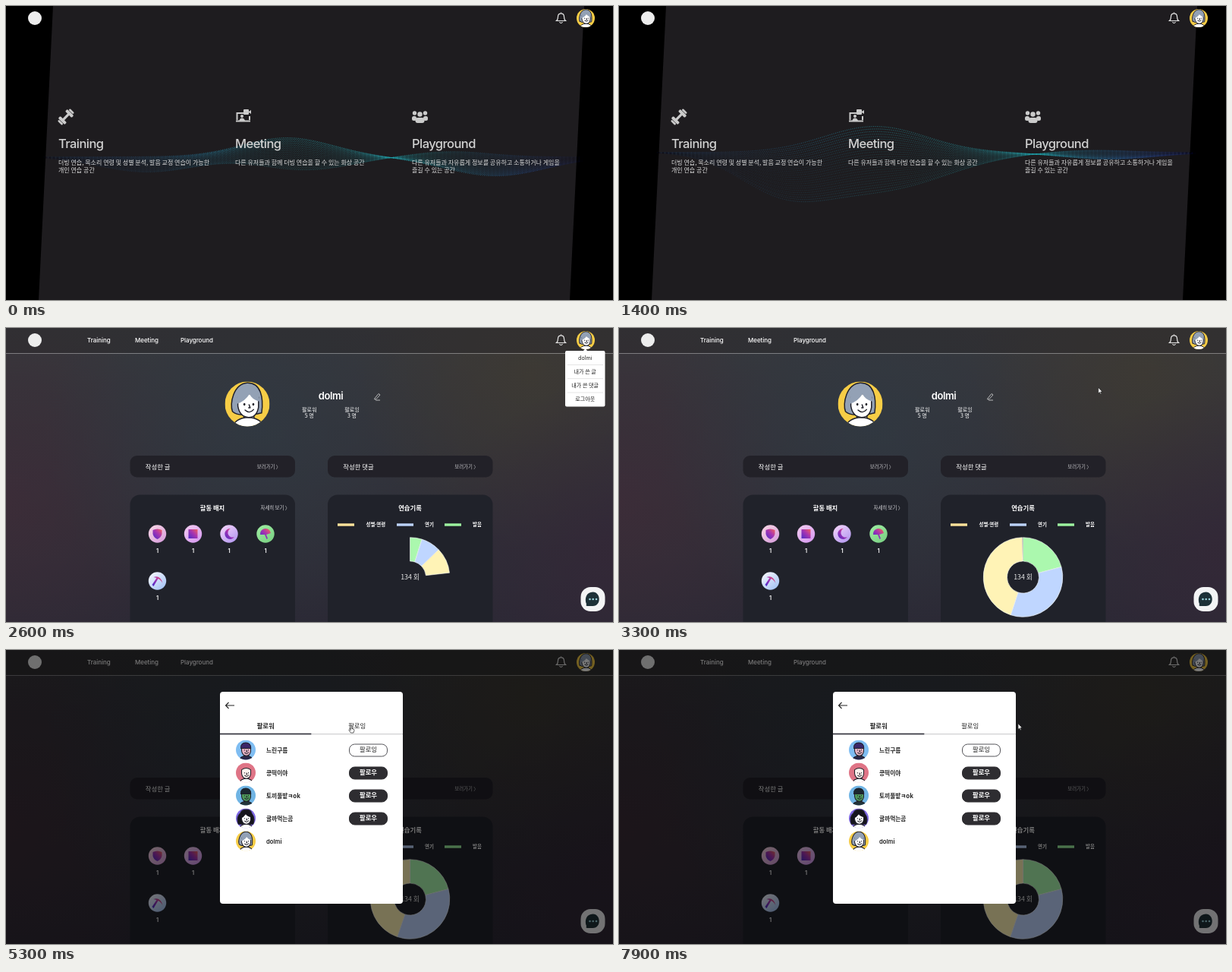
An HTML page with a canvas that plays this animation: 800 px wide and 387 px high, repeating every 8000 ms.

```html
<!DOCTYPE html>
<html lang="ko">
<head>
<meta charset="utf-8">
<style>
html, body { margin: 0; width: 100%; height: 100%; overflow: hidden; background: #000; }
canvas { display: block; width: 800px; height: 387px; }
</style>
</head>
<body>
<canvas id="stage" width="800" height="387"></canvas>
<script>
const ctx = document.getElementById('stage').getContext('2d');
const LOOP = 8000, W = 800, H = 387, TAU = Math.PI * 2;
const LATIN = 'Inter, "Noto Sans CJK KR", sans-serif';
const KOREAN = '"Noto Sans CJK KR", "Noto Sans CJK", sans-serif';
const USER = 'dolmi';
const AT = { menuOpen: 1700, profile: 2400, chart: 2537, menuClose: 3000, modal: 4400, following: 5800, followers: 7500 };

const clamp = v => Math.max(0, Math.min(1, v));
const lerp = (a, b, u) => a + (b - a) * u;
const smooth = u => u * u * (3 - 2 * u);
const between = (t, a, b) => t >= a && t < b;

function text(s, x, y, size, { color = '#fff', align = 'left', weight = 400, spacing = 0 } = {}) {
  const family = /[\u3000-\uffff]/.test(s) ? KOREAN : LATIN;
  ctx.font = `${weight} ${size}px ${family}`;
  ctx.letterSpacing = spacing + 'px';
  ctx.textAlign = align;
  ctx.fillStyle = color;
  ctx.fillText(s, x, y);
}
function rect(x, y, w, h, color) {
  ctx.fillStyle = color;
  ctx.fillRect(x, y, w, h);
}
function roundBox(x, y, w, h, r, fill, stroke) {
  ctx.beginPath();
  ctx.roundRect(x, y, w, h, r);
  ctx.fillStyle = fill;
  ctx.fill();
  if (stroke) { ctx.strokeStyle = stroke; ctx.lineWidth = 1; ctx.stroke(); }
}
function ellipse(x, y, rx, ry, fill, stroke, width = 1) {
  ctx.beginPath();
  ctx.ellipse(x, y, rx, ry, 0, 0, TAU);
  if (fill) { ctx.fillStyle = fill; ctx.fill(); }
  if (stroke) { ctx.strokeStyle = stroke; ctx.lineWidth = width; ctx.stroke(); }
}
function path(d, fill, stroke, width = 1) {
  const p = new Path2D(d);
  if (fill) { ctx.fillStyle = fill; ctx.fill(p); }
  if (stroke) { ctx.strokeStyle = stroke; ctx.lineWidth = width; ctx.stroke(p); }
}
function local(x, y, scale, draw) {
  ctx.save();
  ctx.translate(x, y);
  ctx.scale(scale, scale);
  ctx.lineCap = ctx.lineJoin = 'round';
  draw();
  ctx.restore();
}

const HAIR = {
  bob: 'M-.66 .34C-.8 .0-.62-.9 .0-.94C.6-.95 .74-.3 .64 .4Q.3 .5 0 .45Q-.4 .55-.66 .34Z',
  short: 'M-.5 .05C-.62-.9 .6-.95 .52 .05Z',
  curly: 'M-.75 .6Q-1-.1-.55-.5C-.4-1 .5-1 .6-.5Q1 0 .75 .6Z'
};
function avatar(x, y, r, { bg = '#f7cd46', hair = '#93a1b5', skin = '#fff', shirt = '#fff', style = 'bob' } = {}) {
  const ink = '#20202a', pen = r > 20 ? .05 : .08;
  local(x, y, r, () => {
    ctx.beginPath();
    ctx.arc(0, 0, 1, 0, TAU);
    ctx.clip();
    rect(-1, -1, 2, 2, bg);
    if (style !== 'short' && HAIR[style]) path(HAIR[style], hair, ink, pen);
    path('M-.15 .3V.75H.3V.3Z', skin, ink, pen);
    ellipse(.04, 1.06, .68, .46, shirt, ink, pen);
    path('M-.42-.3Q.05-.62 .5-.3V.15Q.42 .6 .06 .6Q-.34 .58-.42 .1Z', skin, ink, pen);
    if (style === 'bob') path('M-.52 .02Q-.45-.65 .05-.7Q.5-.65 .56-.1Q.2-.2 .1-.45Q-.1-.1-.52 .02Z', hair);
    if (style === 'short') path(HAIR.short.replaceAll('.05', '-.15'), hair, ink, pen);
    if (style === 'curly') path('M-.5 0Q-.4-.7 .1-.7Q.55-.6 .54-.1Q.1-.2 0-.4Q-.2-.1-.5 0Z', hair);
    ellipse(-.13, .02, .045, .06, ink);
    ellipse(.27, .02, .045, .06, ink);
    path('M-.1 .27Q.1 .46 .28 .25M.08 .03L.13 .17H.06', null, ink, pen);
  });
}

const WAVE = [
  { base: 198, top: [[-25, 370, 85], [25, 645, 95]], bottom: [[17, 395, 85], [20, 185, 90], [-7, 585, 70]] },
  { base: 192, top: [[-34, 337, 95], [9, 645, 90]], bottom: [[48, 345, 125], [45, 215, 85], [-3, 620, 70]] }
];
function waveEdge(side, x, u) {
  const [from, to] = WAVE;
  return from[side].reduce((y, [amp, c, w], i) => {
    const [amp2, c2, w2] = to[side][i];
    const d = (x - lerp(c, c2, u)) / lerp(w, w2, u);
    return y + lerp(amp, amp2, u) * Math.exp(-d * d);
  }, lerp(from.base, to.base, u));
}
function drawWave(t) {
  const u = t / 1400, rows = 26;
  for (let x = 50; x < 760; x += 2.5) {
    const a = waveEdge('top', x, u), b = waveEdge('bottom', x, u);
    const fade = clamp((x - 40) / 240) * clamp((765 - x) / 100);
    const hue = x < 400 ? lerp(212, 184, clamp((x - 130) / 230)) : lerp(184, 228, clamp((x - 560) / 170));
    for (let k = 0; k <= rows; k++) {
      const v = k / rows;
      const glow = .17 + .38 * Math.pow(1 - v, 3) + .16 * Math.pow(v, 8);
      ctx.fillStyle = `hsla(${hue},62%,42%,${(glow * fade).toFixed(3)})`;
      ctx.fillRect(x + (k % 2) * 1.2, lerp(a, b, v), 1.1, 1.1);
    }
  }
}

function dumbbell() {
  local(79, 146, 1, () => {
    ctx.rotate(-Math.PI / 4);
    rect(-5, -1.6, 10, 3.2, '#cbcbcb');
    for (const s of [-1, 1]) {
      roundBox(s * 6.5 - 2, -6, 4, 12, 1.3, '#cbcbcb');
      roundBox(s * 10.3 - 1.3, -4, 2.6, 8, 1.2, '#cbcbcb');
    }
  });
}
function meetingIcon() {
  path('M304.5 150V141H313M321 145V150M303 151.5H322', null, '#cbcbcb', 2);
  roundBox(313, 136, 7, 7, 1, '#cbcbcb');
  path('M319 139.5L323 137V142Z', '#cbcbcb');
  ellipse(311, 145, 2, 2, '#cbcbcb');
  path('M307.5 151Q308 147.5 311 147.5T315 151Z', '#cbcbcb');
}
function groupIcon() {
  for (const [x, y, r] of [[538.5, 141, 2.7], [552.5, 141, 2.7], [545.5, 142.5, 3.2]]) ellipse(x, y, r, r, '#cbcbcb');
  roundBox(535, 145, 6, 6, 2.5, '#cbcbcb');
  roundBox(550, 145, 6, 6, 2.5, '#cbcbcb');
  roundBox(539.5, 147, 12, 7, 3, '#cbcbcb');
}
function drawHeader() {
  ellipse(38, 16, 9, 9, '#ededed');
  path('M725.5 19.5H737.5Q735.5 18 735.5 14C735.5 8.5 727.5 8.5 727.5 14Q727.5 18 725.5 19.5ZM731.5 9.8V8.5M729.5 21Q731.5 24 733.5 21', null, '#e8e8e8', 1.2);
  avatar(764, 16, 12);
}
function drawLanding(t) {
  rect(0, 0, W, H, '#000');
  path('M62 0H762L743 387H43Z', '#1e1c1f');
  drawWave(t);
  dumbbell();
  meetingIcon();
  groupIcon();
  const columns = [
    [69, 'Training', '더빙 연습, 목소리 연령 및 성별 분석, 발음 교정 연습이 가능한', '개인 연습 공간'],
    [302, 'Meeting', '다른 유저들과 함께 더빙 연습을 할 수 있는 화상 공간', ''],
    [535, 'Playground', '다른 유저들과 자유롭게 정보를 공유하고 소통하거나 게임을', '즐길 수 있는 공간']
  ];
  for (const [x, title, line1, line2] of columns) {
    text(title, x, 186.5, 16.5, { color: '#d2d2d2', weight: 500, spacing: -.55 });
    text(line1, x, 209, 8, { color: '#dcdcdc' });
    text(line2, x, 219, 8, { color: '#dcdcdc' });
  }
  drawHeader();
}

function glow(x, y, r, color) {
  const g = ctx.createRadialGradient(x, y, 0, x, y, r);
  g.addColorStop(0, `rgba(${color},.8)`);
  g.addColorStop(1, `rgba(${color},0)`);
  rect(0, 0, W, H, g);
}
function drawBackdrop() {
  const g = ctx.createLinearGradient(0, 0, 0, H);
  g.addColorStop(0, '#38383c');
  g.addColorStop(1, '#2b2935');
  rect(0, 0, W, H, g);
  glow(0, 230, 260, '62,44,56');
  glow(330, 130, 280, '48,57,66');
  glow(690, 60, 230, '62,58,50');
  glow(800, 300, 230, '52,39,55');
  rect(0, 0, W, 33, 'rgba(42,40,42,.5)');
  rect(0, 33, W, 1, 'rgba(255,255,255,.35)');
}

const BADGES = [
  [199.5, 271, '#f6d2e4', '#d8a0dc', 'M-6-5Q0-8 6-5V0Q5 5 0 7Q-5 5-6 0Z'],
  [246.5, 271, '#f0c8f0', '#d79cf0', 'M-6-6H6V6H-6Z'],
  [294, 271, '#f0d0fa', '#b59af0', 'M2-7A7 7 0 1 0 7 4A6 6 0 0 1 2-7Z'],
  [342, 271, '#9cecA0', '#7bd184', 'M-7 1A7 7 0 0 1 7-1L1 1L3 6L1.5 7L-1 1Z'],
  [199.5, 333, '#f2f4ff', '#a6c4f4', 'M-5-5Q4-8 7 3Q4-2 1-3L-5 7L-7 5L-1-4Z']
];
function drawBadge([x, y, light, shade, shape]) {
  local(x, y, 1, () => {
    const disc = ctx.createLinearGradient(-8, -10, 8, 10);
    disc.addColorStop(0, light);
    disc.addColorStop(1, shade);
    ellipse(0, 0, 11.7, 11.7, disc);
    const tint = ctx.createLinearGradient(-6, 6, 6, -6);
    tint.addColorStop(0, '#4c2cc8');
    tint.addColorStop(.55, '#a934b0');
    tint.addColorStop(1, '#f0625c');
    path(shape, tint);
  });
  text('1', x, y + 24.5, 7.5, { align: 'center', weight: 600 });
}

const RECORDS = [[28, '#abf8ae'], [46, '#bfd6ff'], [60, '#fff3b6']];
function drawChart(t) {
  const p = 1 - Math.pow(1 - clamp((t - AT.chart) / 1000), 4);
  let angle = -Math.PI / 2;
  if (p > 0) for (const [count, color] of RECORDS) {
    const end = angle + TAU * p * count / 134;
    ctx.beginPath();
    ctx.arc(532.5, 328, 52.3, angle, end);
    ctx.arc(532.5, 328, 21, end, angle, true);
    ctx.closePath();
    ctx.fillStyle = color;
    ctx.fill();
    ctx.strokeStyle = 'rgba(255,255,255,.8)';
    ctx.lineWidth = .7;
    ctx.stroke();
    angle = end;
  }
  text('134 회', 532.5, 331, 8.8, { align: 'center', color: '#e8e8e8' });
}
function drawCount(x, label, count, hovered) {
  const style = { align: 'center', weight: hovered ? 700 : 500 };
  text(label, x, 109.5, 7, style);
  text(count, x, 118, 7, style);
  if (hovered) {
    rect(x - 10, 110.5, 20, .8, '#fff');
    rect(x - 6.5, 119, 13, .8, '#fff');
  }
}
function drawProfile(t) {
  drawBackdrop();
  drawHeader();
  [['Training', 107], ['Meeting', 170], ['Playground', 230]].forEach(([s, x]) => text(s, x, 18.7, 8, { weight: 500, spacing: -.05 }));

  avatar(318, 100, 29.5);
  text(USER, 428, 93.5, 13, { align: 'center', weight: 600, spacing: -.4 });
  path('M486 92.5L491 86.5L493 88L488 93.5L485.7 94ZM487 95H493', null, '#c8c8c8', .9);
  drawCount(399.7, '팔로워', '5 명', between(t, 3850, AT.modal));
  drawCount(456, '팔로잉', '3 명', false);

  for (const [x, title] of [[163.5, '작성한 글'], [424, '작성한 댓글']]) {
    roundBox(x, 168, 217.5, 28.5, 9, '#222128');
    text(title, x + 20.3, 185.5, 8.4, { weight: 500 });
    text('보러가기 〉', x + 167.3, 184.7, 6.4, { color: '#c2c2c6' });
    roundBox(x, 219.5, 217.5, 190, 13, '#20222a');
  }
  text('활동 배지', 272, 240, 8.3, { align: 'center', weight: 700 });
  text('자세히 보기 〉', 335.5, 239.3, 6.4, { color: '#d4d4d8' });
  BADGES.forEach(drawBadge);

  text('연습기록', 532.5, 240, 8.3, { align: 'center', weight: 700 });
  const legend = [[437, '#ffe39b', '성별·연령', 474.5], [515, '#bcd3fb', '연기', 552], [578, '#9df4a0', '발음', 615]];
  for (const [x, color, label, labelX] of legend) {
    rect(x, 257.3, 22, 3.4, color);
    text(label, labelX, 261.3, 6.4, { weight: 700 });
  }
  drawChart(t);

  roundBox(757.5, 341, 32, 32, 13, '#f3f4f5');
  path('M773.5 347.5C784 347.5 785 366 773.5 366H766Q764 366 765 363.5C762 356 765 347.5 773.5 347.5Z', '#1d3138');
  for (const x of [769.5, 773.7, 778]) ellipse(x, 357, 1.3, 1.3, '#9cd4dc');
}
function drawMenu() {
  path('M760 31L763.5 27L767 31Z', '#fff');
  roundBox(737, 30, 52.5, 73.5, 2, '#fff');
  [USER, '내가 쓴 글', '내가 쓴 댓글', '로그아웃'].forEach((s, i) => {
    const y = 41.5 + i * 18.3;
    text(s, 763.2, y, 7.1, { align: 'center', color: '#222' });
    if (i) rect(740, y - 11.8, 47, .8, '#dedede');
  });
}

const SELF = { name: USER };
const FRIEND = '느린구름';
const FOLLOWERS = [
  { name: FRIEND, button: '팔로잉', look: { bg: '#7fbdf2', hair: '#3b2668', skin: '#e6b4c4', shirt: '#28284a', style: 'short' } },
  { name: '콩떡이야', button: '팔로우', look: { bg: '#df7486', skin: '#fff2ee', style: 'bald' } },
  { name: '토끼풀밭ㅋok', button: '팔로우', look: { bg: '#70b4e4', hair: '#1b2730', skin: '#4f9a5c', shirt: '#23343c', style: 'short' } },
  { name: '귤까먹는곰', button: '팔로우', look: { bg: '#7f68e4', hair: '#15141c', style: 'curly' } },
  SELF
];
const FOLLOWING = [
  { name: '오늘도맑음!!', button: '팔로잉', look: { bg: '#c9e0ee' } },
  { ...SELF, note: '나' },
  { name: FRIEND, button: '팔로잉', look: { bg: '#83bdf4', hair: '#17172a', skin: '#f6dfc0', shirt: '#20243c', style: 'short' } }
];
function drawRow({ name, button, note, look }, i) {
  const y = 131.5 + i * 30;
  avatar(316, y, 13, look);
  text(name, 343, y + 3, 7.7, { color: '#222', weight: 600 });
  if (note) text(note, 477.5, y + 2.8, 8.4, { color: '#222', align: 'center' });
  if (!button) return;
  const dark = button === '팔로우';
  roundBox(452.5, y - 7.5, 50, 16, 7, dark ? '#2e2d31' : '#fff', dark ? '#2e2d31' : '#55555a');
  text(button, 477.5, y + 2.8, 8.4, { color: dark ? '#fff' : '#222', align: 'center', weight: dark ? 600 : 500 });
}
function drawModal(t) {
  const following = between(t, AT.following, AT.followers);
  ctx.globalAlpha = clamp((t - AT.modal + 20) / 120);
  rect(0, 0, W, H, 'rgba(0,0,0,.53)');
  roundBox(282, 55, 241, 279, 4, '#fff');
  path('M301 73H289.5M293.5 69L289.5 73L293.5 77', null, '#222', 1.1);
  ['팔로워', '팔로잉'].forEach((label, i) => {
    const active = following === (i === 1), x = 282 + i * 120.5;
    text(label, x + 60.2, 102.8, 8.4, { align: 'center', color: '#222', weight: active ? 700 : 400 });
    rect(x, active ? 109.7 : 110.2, 120.5, active ? 1.6 : 1, active ? '#2b2b36' : '#c6c6c8');
  });
  if (following) {
    if (between(t, 6000, 6950)) rect(282, 116.5, 241, 30, '#ededec');
    text(';', 281.5, 215, 7, { color: '#222' });
  }
  (following ? FOLLOWING : FOLLOWERS).forEach(drawRow);
  ctx.globalAlpha = 1;
}

const TRACK = [
  [2750, 764, 42], [2950, 760, 60], [3800, 414, 110], [4450, 414, 110], [5200, 454, 100],
  [5800, 454, 100], [6200, 492, 139], [6750, 492, 139], [7300, 346, 100], [7600, 346, 100], [7900, 526, 97], [8000, 526, 97]
];
function drawCursor(t) {
  const i = TRACK.findIndex(([time]) => time > t);
  if (i < 1) return;
  const [t0, x0, y0] = TRACK[i - 1], [t1, x1, y1] = TRACK[i];
  const u = smooth((t - t0) / (t1 - t0));
  const x = lerp(x0, x1, u), y = lerp(y0, y1, u);
  const overTab = t > AT.modal && between(y, 92, 110) && x < 523;
  const hand = overTab || between(t, 3800, AT.modal) || t < 2900;
  const shape = hand
    ? 'M0 0Q1-1.2 1.8 0V3.5L4.5 4.3Q5.3 4.8 4.8 6.5L4 9H.3L-2 5.6Q-2.3 4.4-1 4.8L0 5.5Z'
    : 'M0 0V7.5L1.7 6L3 8.6L4.1 8L2.9 5.5H5.2Z';
  local(x, y, 1, () => path(shape, '#fff', '#222', .7));
}

function frame() {
  const t = performance.now() % LOOP;
  if (t < AT.profile) drawLanding(t);
  else drawProfile(t);
  if (between(t, AT.menuOpen, AT.menuClose)) drawMenu();
  if (t >= AT.modal) drawModal(t);
  drawCursor(t);
  requestAnimationFrame(frame);
}
frame();
</script>
</body>
</html>
```
